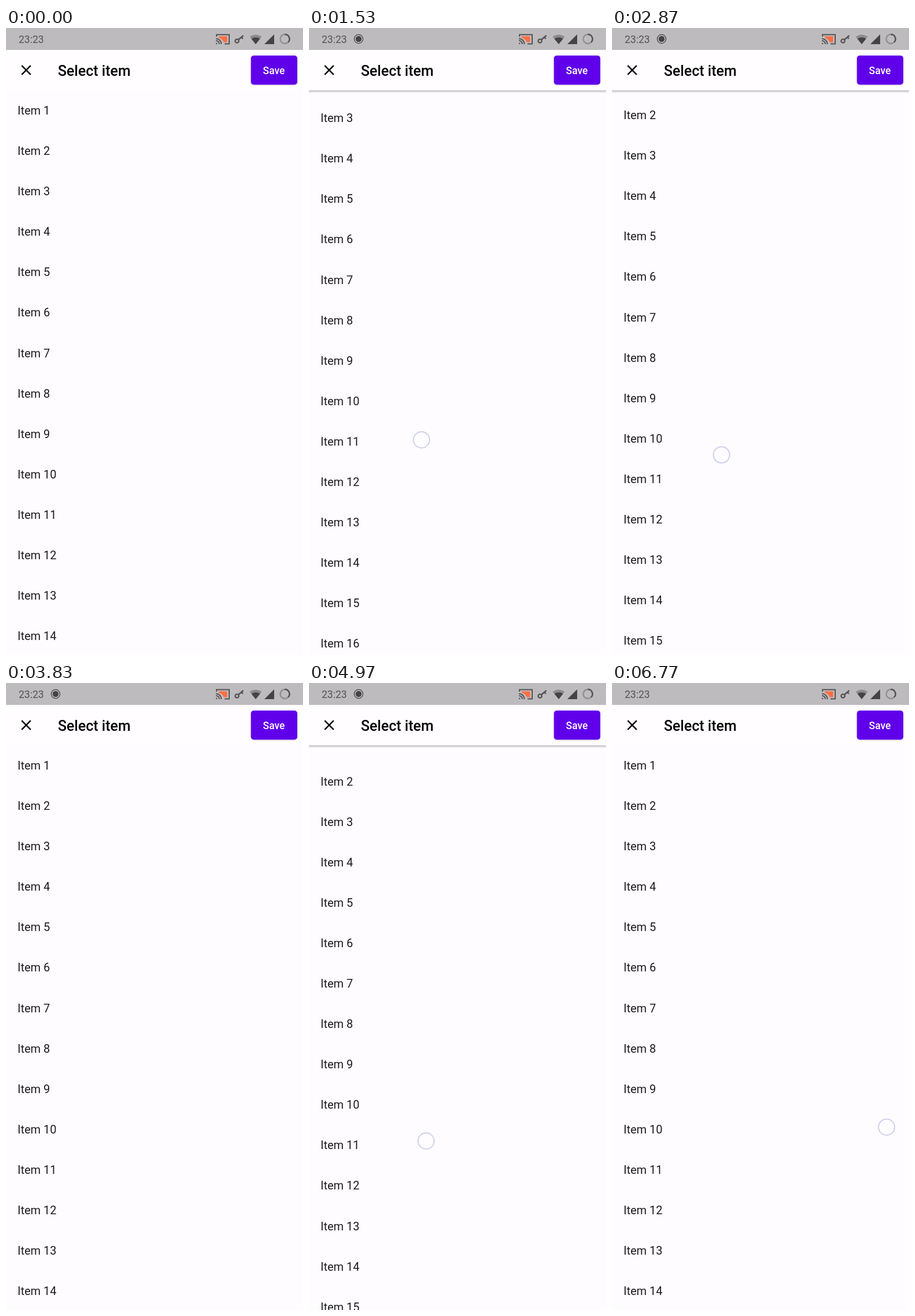
These frames come from a looping animation (515 px wide and 1087 px high, 6.81 s). An HTML page:

```html
<!DOCTYPE html>
<html lang="en">
<head>
<meta charset="utf-8">
<title>Scrolling list</title>
<style>
  html, body { margin: 0; width: 100%; height: 100%; overflow: hidden; background: #fffcff; }
  svg { display: block; width: 100%; height: 100%; font-family: Roboto, sans-serif; }
  .medium { font-weight: 500; }
</style>
</head>
<body>
<svg viewBox="0 0 515 1087">
  <defs>
    <linearGradient id="shade" x2="0" y2="1">
      <stop offset="0" stop-color="#000" stop-opacity=".25"/>
      <stop offset="1" stop-color="#000" stop-opacity="0"/>
    </linearGradient>
    <filter id="lift" x="-10%" y="-10%" width="120%" height="125%">
      <feDropShadow dx="0" dy="1" stdDeviation=".8" flood-opacity=".2"/>
    </filter>
  </defs>
  <rect width="515" height="1087" fill="#fffcff"/>
  <g id="list" font-size="20.03" fill="#1c1b1e"></g>

  <rect id="shadow" y="108" width="515" height="5" fill="url(#shade)"/>
  <rect y="38" width="515" height="70" fill="#fffdff"/>
  <path d="M27.2 65.2l15.6 15.6m0-15.6l-15.6 15.6" stroke="#000" stroke-width="2.5"/>
  <text class="medium" x="90" y="82.5" font-size="25.04">Select item</text>
  <rect x="424.700" y="47.800" width="80.400" height="50.400" rx="5" fill="#6000eb" filter="url(#lift)"/>
  <text class="medium" x="464.500" y="79.500" font-size="17.520" fill="#fff" text-anchor="middle">Save</text>

  <rect width="515" height="38" fill="#bebbbe"/>
  <g fill="#555355">
    <text x="22" y="26" font-size="17.520">23:23</text>
    <g id="record">
      <circle cx="86" cy="19" r="7.600" fill="none" stroke="#454345" stroke-width="1.300"/>
      <circle cx="86" cy="19" r="5.200" fill="#454345"/>
    </g>
    <g fill="none" stroke="#555355" stroke-width="2">
      <path d="M369 14.500h14.500v10h-6q-2-6-8.500-7.500z" fill="#ff6e42" stroke="none"/>
      <path d="M365 15v-3.500h22v16h-8M364 18.500a9.500 9.500 0 0 1 9.500 9.500M364 22a6 6 0 0 1 6 6"/>
      <path d="M364 25.500v2.500h2.500a2.500 2.500 0 0 0-2.500-2.500z" fill="#555355" stroke="none"/>
      <circle cx="400.500" cy="22.500" r="3.200" stroke-width="2.300"/>
      <path d="M403 20.200l8.500-7.200M408 15.500l2.700 3.200" stroke-width="2.500"/>
    </g>
    <path d="M433 28l-10.500-13q10.500-7 21 0z" fill="#8d8b8d"/>
    <path d="M433 28l-7.500-9.300q7.500-4.700 15 0z" fill="#454345"/>
    <path d="M465 11v17h-17z" fill="#454345"/>
    <g fill="none" stroke-width="2.400">
      <circle cx="483.500" cy="19" r="8" stroke="#918f91"/>
      <path d="M483.500 11a8 8 0 0 1 5.700 13.700" stroke="#555355"/>
    </g>
  </g>

  <circle id="touch" r="14" fill="#fff" fill-opacity=".45" stroke="#cfd0ea" stroke-width="2"/>
</svg>
<script>
const LOOP = 6810, ROW = 70.08, ITEMS = 16;
const SLOP = 10;          // finger travel before the list follows
const SCROLL_END = 141;   // the list stops here while the finger moves on
const LEAN = 0.2;         // sideways drift per pixel of lift
const part = id => document.getElementById(id);
const list = part('list'), shadow = part('shadow'), record = part('record'), touch = part('touch');

for (let n = 1; n <= ITEMS; n++) {
  const label = document.createElementNS(list.namespaceURI, 'text');
  label.setAttribute('x', 20);
  label.setAttribute('y', 80 + n * ROW);
  label.textContent = 'Item ' + n;
  list.append(label);
}

// Each drag lifts the finger by `reach` until `turn`, then pulls the list back to its top.
const drags = [
  { start: 679, turn: 1859, end: 3663, x: 167.7, y: 851, reach: 190 },
  { start: 4000, turn: 4580, end: 5480, x: 192.5, y: 846.5, reach: 85 }
];
const rest = { start: 5900, move: 6400, x: 468, y: 779, dx: 9, dy: -10 };

const clamp = (v, low, high) => Math.min(high, Math.max(low, v));
const progress = (time, from, to) => clamp((time - from) / (to - from), 0, 1);

function dragPose({ start, turn, end, x, y, reach }, time) {
  const travel = Math.min(SCROLL_END, reach - SLOP);
  const back = travel * progress(time, turn, end);
  const lift = reach * progress(time, start, turn) - back;
  const offset = time < turn ? clamp(lift - SLOP, 0, SCROLL_END) : travel - back;
  return { offset, x: x + lift * LEAN, y: y - lift };
}

function restPose(time) {
  const k = progress(time, rest.move, LOOP);
  return { offset: 0, x: rest.x + rest.dx * k, y: rest.y + rest.dy * k };
}

function draw(now) {
  const time = now % LOOP;
  const drag = drags.find(d => time >= d.start && time < d.end);
  const pose = drag ? dragPose(drag, time) : time >= rest.start ? restPose(time) : null;
  const offset = pose ? pose.offset : 0;

  list.setAttribute('transform', `translate(0 ${-offset})`);
  shadow.setAttribute('opacity', Math.min(1, offset / 12));
  record.setAttribute('visibility', time > 400 && time < 5300 ? 'visible' : 'hidden');
  touch.setAttribute('visibility', pose ? 'visible' : 'hidden');
  if (pose) touch.setAttribute('transform', `translate(${pose.x} ${pose.y})`);
}

let start;
function tick(now) {
  start ??= now;
  draw(now - start);
  requestAnimationFrame(tick);
}
draw(0);
requestAnimationFrame(tick);
</script>
</body>
</html>
```
